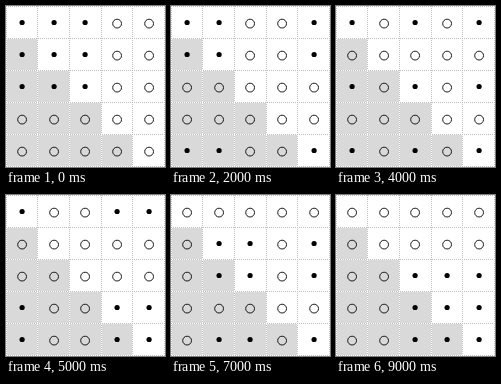
These frames come from a looping animation (159 by 161 pixels, 10 s). An HTML page:

```html
<!DOCTYPE html>
<html lang="en">
<head>
<meta charset="utf-8">
<title>Three-element subsets of five</title>
<style>
  html, body { margin: 0; width: 100%; height: 100%; overflow: hidden; background: #fff; }
  svg { display: block; width: 100vw; height: 100vh; }
</style>
</head>
<body>
<svg id="stage" viewBox="0 0 159 161"></svg>
<script>
const SIZE = 5, STEP_MS = 1000;
const stage = document.getElementById('stage');
const columnEdge = i => Math.round(i * 31.6 - .2);
const columnCenter = i => Math.round(i * 31.7) + 16.1;
const rowEdge = i => i * 32;

function add(name, attributes) {
  const node = document.createElementNS('http://www.w3.org/2000/svg', name);
  for (const key in attributes) node.setAttribute(key, attributes[key]);
  return stage.appendChild(node);
}

function gridLine(d) {
  add('path', { d, stroke: '#fff', 'shape-rendering': 'crispEdges' });
  add('path', { d, stroke: '#c0c0c0', 'stroke-dasharray': '1 1', 'shape-rendering': 'crispEdges' });
}

// Shade the cells below the diagonal
for (let row = 1; row < SIZE; row++) {
  add('rect', { x: 0, y: rowEdge(row), width: columnEdge(row), height: 32, fill: '#d9d9d9' });
}
for (let i = 0; i <= SIZE; i++) {
  gridLine(`M0 ${rowEdge(i) + .5}H159`);
  gridLine(`M${columnEdge(i) + .5} 0V161`);
}

const cells = [];
for (let row = 0; row < SIZE; row++) {
  for (let column = 0; column < SIZE; column++) {
    const cx = columnCenter(column), y = rowEdge(row);
    cells.push({
      row, column,
      ring: add('circle', { cx, cy: y + 17.6, r: 4.4, fill: 'none', stroke: '#000', 'stroke-width': .9 }),
      dot: add('circle', { cx, cy: y + 16.5, r: 2.6 })
    });
  }
}

// All three-element subsets in lexicographic order
const subsets = [];
for (let a = 0; a < SIZE; a++)
  for (let b = a + 1; b < SIZE; b++)
    for (let c = b + 1; c < SIZE; c++) subsets.push([a, b, c]);

function draw() {
  const subset = subsets[Math.floor(performance.now() / STEP_MS) % subsets.length];
  for (const { row, column, ring, dot } of cells) {
    const chosen = subset.includes(row) && subset.includes(column);
    dot.style.display = chosen ? '' : 'none';
    ring.style.display = chosen ? 'none' : '';
  }
  requestAnimationFrame(draw);
}
draw();
</script>
</body>
</html>
```
